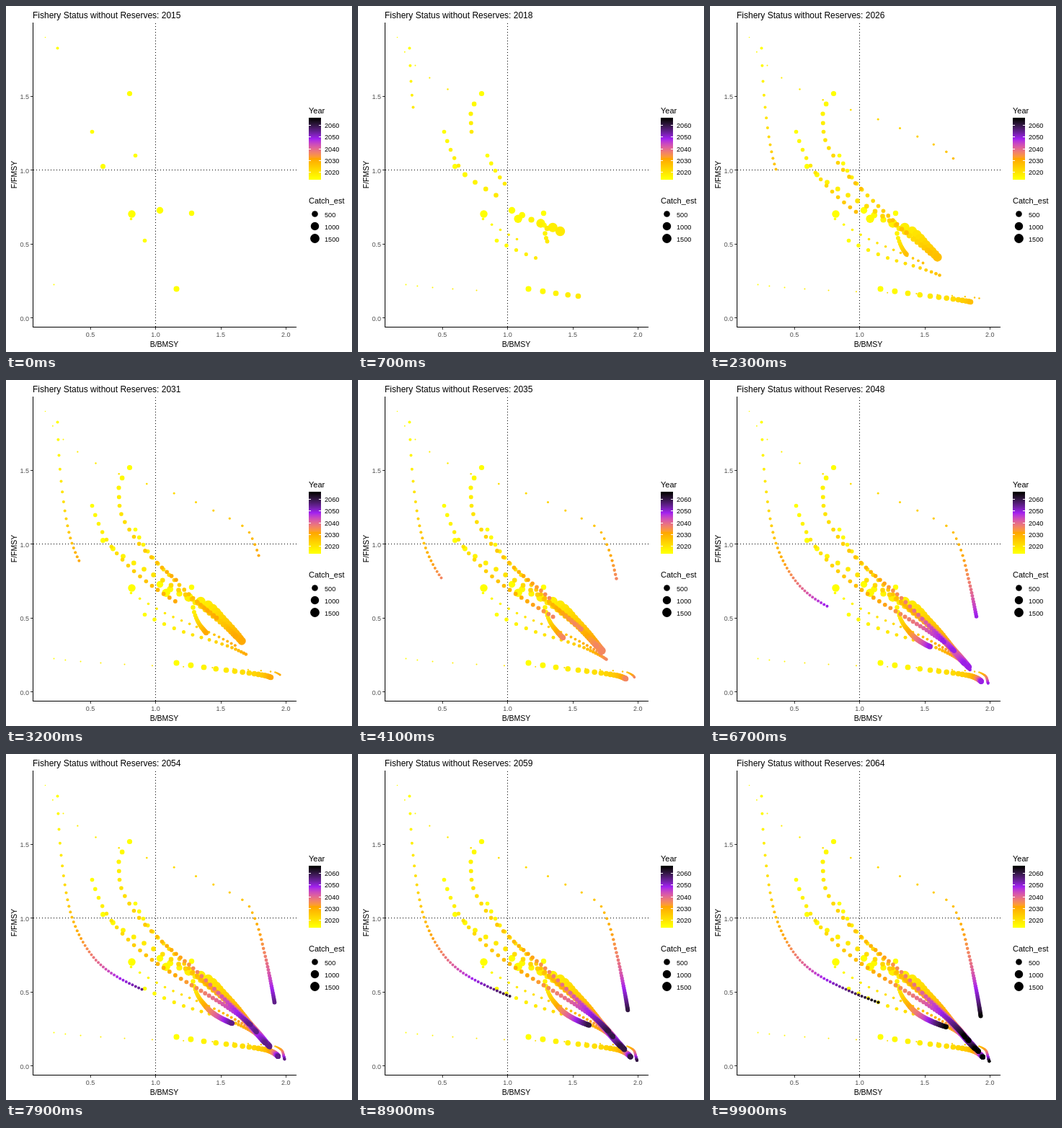
An HTML page with a canvas that plays this animation: 480 px wide and 480 px high, repeating every 10 s.

```html
<!DOCTYPE html>
<html lang="en">
<head>
<meta charset="utf-8">
<title>Fishery Status</title>
<style>
html, body { margin: 0; width: 100%; height: 100%; overflow: hidden; background: #fff; }
canvas { display: block; width: 480px; height: 480px; }
</style>
</head>
<body>
<canvas id="stage" width="480" height="480"></canvas>
<script>
const ctx = document.getElementById('stage').getContext('2d');
const FONT = '"Liberation Sans", Arial, sans-serif';
const LOOP = 10000, STEP = 100, YEARS = 50;

// Years after 2015 at which positions and radii are given
const POS_KNOTS = [0, 2, 4, 8, 12, 21, 28, 40, 50];
const RAD_KNOTS = [0, 4, 21, 50];

// Monotone cubic interpolation
function curve(ts, vs) {
  const n = ts.length;
  const h = [], s = [];
  for (let i = 0; i < n - 1; i++) {
    h.push(ts[i + 1] - ts[i]);
    s.push((vs[i + 1] - vs[i]) / h[i]);
  }
  const edge = (h0, h1, s0, s1) => {
    const d = ((2 * h0 + h1) * s0 - h0 * s1) / (h0 + h1);
    if (d * s0 <= 0) return 0;
    return Math.abs(d) > 3 * Math.abs(s0) ? 3 * s0 : d;
  };
  const d = [edge(h[0], h[1], s[0], s[1])];
  for (let i = 1; i < n - 1; i++) {
    const a = 2 * h[i] + h[i - 1], b = h[i] + 2 * h[i - 1];
    d.push(s[i - 1] * s[i] <= 0 ? 0 : (a + b) / (a / s[i - 1] + b / s[i]));
  }
  d.push(edge(h[n - 2], h[n - 3], s[n - 2], s[n - 3]));
  return t => {
    let i = 0;
    while (i < n - 2 && t > ts[i + 1]) i++;
    const u = (t - ts[i]) / h[i], v = 1 - u;
    return vs[i] * (1 + 2 * u) * v * v + vs[i + 1] * u * u * (3 - 2 * u)
      + h[i] * u * v * (d[i] * v - d[i + 1] * u);
  };
}

const stocks = [];
function stock(xs, ys, rs) {
  stocks.push({ x: curve(POS_KNOTS, xs), y: curve(POS_KNOTS, ys), r: curve(RAD_KNOTS, rs) });
}

stock([54, 79, 124, 263, 337, 358, 365, 372, 375], [43, 82, 115, 169, 211, 275, 307, 344, 363], [0.8, 1.2, 2.3, 3]);
stock([71, 73, 76, 83, 91, 115, 138, 188, 233], [58, 104, 140, 192, 226, 274, 298, 326, 344], [2, 2, 2, 2]);
stock([171, 156, 157, 177, 209, 265, 303, 336, 352], [121, 149, 174, 217, 253, 302, 340, 374, 390], [3.6, 2.8, 2.8, 3.2]);
stock([119, 128, 139, 169, 202, 270, 304, 339, 353], [174, 199, 221, 257, 285, 328, 349, 375, 392], [2.8, 2.7, 3, 3.2]);
stock([134, 162, 191, 239, 272, 309, 327, 347, 358], [222, 244, 262, 291, 314, 345, 363, 385, 397], [3.5, 3.3, 3.4, 3.5]);
stock([179, 190, 203, 233, 259, 300, 322, 346, 359], [207, 228, 246, 277, 302, 338, 360, 384, 397], [2.8, 2.8, 3, 3.2]);
stock([173, 197, 220, 264, 295, 337, 350, 364, 371], [295, 310, 323, 342, 356, 380, 392, 405, 412], [1.8, 1.8, 2, 2]);
stock([213, 240, 262, 287, 305, 330, 343, 359, 367], [283, 296, 308, 327, 342, 368, 382, 400, 408], [4.7, 3.8, 4, 3.5]);
stock([257, 259, 262, 267, 272, 284, 296, 313, 327], [287, 315, 326, 337, 344, 357, 365, 373, 378], [3.7, 2.9, 3.7, 3.4]);
stock([192, 219, 246, 291, 318, 344, 353, 366, 372], [325, 338, 349, 363, 373, 387, 395, 407, 413], [2.8, 2.5, 2.3, 2.5]);
stock([66, 103, 164, 315, 373, 383, 384.5, 386, 387], [386, 390, 394, 400, 405, 412, 417, 423, 426], [1, 1, 1.7, 2]);
stock([236, 274, 305, 344, 361, 371, 374, 377, 378], [392, 398, 402, 407, 410, 414, 416, 419, 420], [4, 3.8, 3.8, 3.4]);
stock([174, 253, 280, 299, 315, 338, 350, 365, 372], [288, 301, 312, 331, 348, 375, 388, 405, 412], [5.2, 6.7, 5.2, 3.5]);

// Gradient stops blended in CIE Lab
const WHITE = [0.9505, 1, 1.089];

function toLab(rgb) {
  const [r, g, b] = rgb.map(c => {
    c /= 255;
    return c > 0.04045 ? ((c + 0.055) / 1.055) ** 2.4 : c / 12.92;
  });
  const [x, y, z] = [
    0.4124 * r + 0.3576 * g + 0.1805 * b,
    0.2126 * r + 0.7152 * g + 0.0722 * b,
    0.0193 * r + 0.1192 * g + 0.9505 * b
  ].map((v, i) => {
    v /= WHITE[i];
    return v > 0.008856 ? Math.cbrt(v) : 7.787 * v + 16 / 116;
  });
  return [116 * y - 16, 500 * (x - y), 200 * (y - z)];
}

function toCss([l, a, b]) {
  const fy = (l + 16) / 116;
  const [x, y, z] = [fy + a / 500, fy, fy - b / 200].map((f, i) =>
    WHITE[i] * (f > 0.2069 ? f ** 3 : (f - 16 / 116) / 7.787));
  const rgb = [
    3.2406 * x - 1.5372 * y - 0.4986 * z,
    -0.9689 * x + 1.8758 * y + 0.0415 * z,
    0.0557 * x - 0.204 * y + 1.057 * z
  ].map(c => {
    c = Math.min(1, Math.max(0, c));
    return Math.round(255 * (c > 0.0031308 ? 1.055 * c ** (1 / 2.4) - 0.055 : 12.92 * c));
  });
  return `rgb(${rgb})`;
}

const STOPS = [[255, 255, 0], [255, 165, 0], [160, 32, 240], [0, 0, 0]].map(toLab);

function shade(t) {
  const p = Math.min(1, Math.max(0, t)) * 3;
  const i = Math.min(2, Math.floor(p));
  return toCss(STOPS[i].map((v, k) => v + (STOPS[i + 1][k] - v) * (p - i)));
}

const dots = [];
for (let i = 0; i <= YEARS; i++) {
  const color = shade(i / YEARS);
  dots.push(stocks.map(s => ({ x: s.x(i), y: s.y(i), r: s.r(i), color })));
}

function text(str, x, y, size, align = 'left', color = '#000') {
  ctx.font = `${size}px ${FONT}`;
  ctx.textAlign = align;
  ctx.fillStyle = color;
  ctx.fillText(str, x, y);
}

function rect(x, y, w, h, color = '#000') {
  ctx.fillStyle = color;
  ctx.fillRect(x, y, w, h);
}

function dot(x, y, r, color) {
  ctx.fillStyle = color;
  ctx.beginPath();
  ctx.arc(x, y, r, 0, 2 * Math.PI);
  ctx.fill();
}

function drawAxes() {
  rect(37, 23, 1, 423);
  rect(37, 445, 366, 1);
  ['0.0', '0.5', '1.0', '1.5'].forEach((s, i) => {
    const y = 433 - i * 102.4;
    rect(34, Math.round(y) - 1, 3, 1, '#333');
    text(s, 32, y + 3.5, 9, 'right', '#4d4d4d');
  });
  ['0.5', '1.0', '1.5', '2.0'].forEach((s, i) => {
    const x = 117 + i * 90.4;
    rect(Math.round(x), 446, 1, 3, '#333');
    text(s, x, 459, 9, 'center', '#4d4d4d');
  });
  text('B/BMSY', 219.5, 473, 10.5, 'center');
  ctx.save();
  ctx.translate(15, 234);
  ctx.rotate(-Math.PI / 2);
  text('F/FMSY', 0, 0, 10.5, 'center');
  ctx.restore();
}

function drawGuides() {
  for (let x = 38; x < 403; x += 4) rect(x, 227, 1, 1);
  for (let y = 444; y >= 23; y -= 4) rect(207, y, 1, 1);
}

function drawLegends() {
  text('Year', 420, 149, 11);
  for (let y = 155; y < 241; y++) rect(420, y, 17, 1, shade((238.8 - y - 0.5) / 82));
  for (let i = 0; i < 5; i++) {
    const y = 230 - i * 16.2;
    rect(420, Math.round(y), 3, 1, '#fff');
    rect(434, Math.round(y), 3, 1, '#fff');
    text(String(2020 + 10 * i), 442, y + 4, 9.2);
  }
  text('Catch_est', 420, 274, 11);
  [4.3, 5.7, 6.4].forEach((r, i) => {
    const y = 288.5 + 17 * i;
    dot(428.5, y, r, '#000');
    text(String(500 * (i + 1)), 442, y + 4, 9.2);
  });
}

function draw(ms) {
  const tick = Math.floor((ms % LOOP) / STEP);
  rect(0, 0, 480, 480, '#fff');
  drawGuides();
  const last = Math.ceil(tick / 2);
  for (let i = 0; i <= last; i++) {
    for (const d of dots[i]) dot(d.x + 0.5, d.y + 0.5, d.r, d.color);
  }
  drawAxes();
  drawLegends();
  text('Fishery Status without Reserves: ' + (2015 + Math.floor(tick / 2)), 37, 17, 12);
}

let start = null;
function loop(now) {
  if (start === null) start = now;
  draw(now - start);
  requestAnimationFrame(loop);
}
draw(0);
requestAnimationFrame(loop);
</script>
</body>
</html>
```
